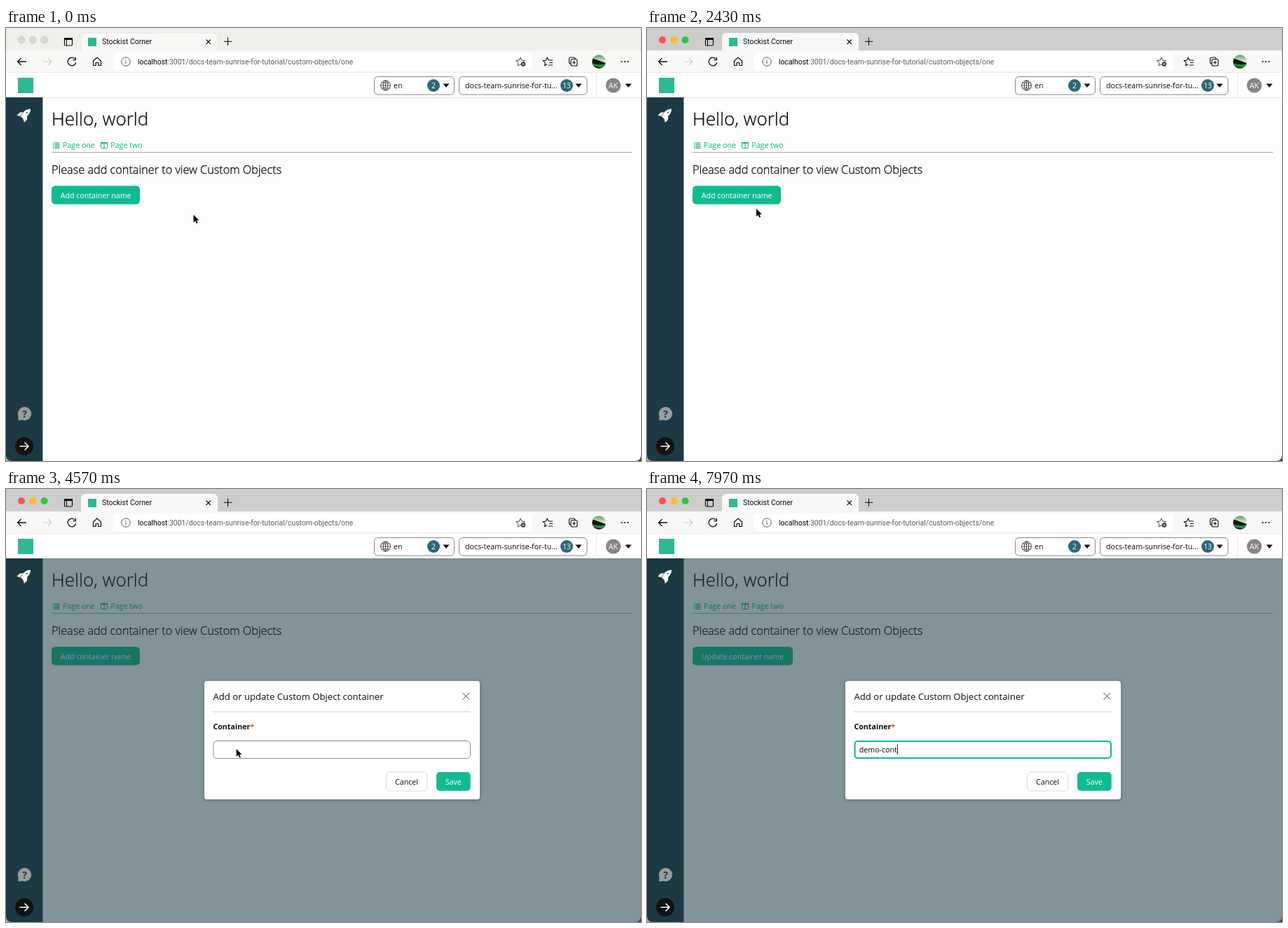
An HTML page with a canvas that plays this animation: 906 by 618 pixels, repeating every 8 s.

```html
<!DOCTYPE html>
<html lang="en">
<head>
<meta charset="utf-8">
<title>Custom objects</title>
<style>
html, body { margin: 0; width: 100%; height: 100%; overflow: hidden; background: #fdfdfd; }
canvas { display: block; width: 906px; height: 618px; }
</style>
</head>
<body>
<canvas id="stage"></canvas>
<script>
const W = 906, H = 618, LOOP = 8000, SIDE = 52.4;
const canvas = document.getElementById('stage');
const ratio = window.devicePixelRatio || 1;
canvas.width = W * ratio;
canvas.height = H * ratio;
const c = canvas.getContext('2d');

const UI = '"Open Sans", sans-serif', CHROME = 'Roboto, sans-serif';
const GREEN = '#11bb91', NAVY = '#1d3943', TEAL = '#2f6875', INK = '#0c0c0c';

const TIMES = { activate: 1900, click: 3400, focus: 4720, type: 6750 };
const TYPED = 'demo-cont', KEY_GAP = 140;

// Pointer stops: time, x, y
const PATH = [
  [0, 267.5, 266.5], [870, 267.5, 266.5], [1220, 164, 243], [1700, 164, 243],
  [2050, 156, 258], [2600, 156, 258], [2950, 155, 241], [4200, 155, 241], [4620, 335.5, 376]
];

const clamp = v => Math.max(0, Math.min(1, v));
const ease = v => v * v * (3 - 2 * v);
const ramp = (t, from, span) => ease(clamp((t - from) / span));

function pointerAt(t) {
  let i = PATH.length - 1;
  while (PATH[i][0] > t) i--;
  const a = PATH[i], b = PATH[i + 1] || a;
  const k = ramp(t, a[0], b[0] - a[0] || 1);
  return { x: a[1] + (b[1] - a[1]) * k, y: a[2] + (b[2] - a[2]) * k };
}

function rect(x, y, w, h, fill) {
  c.fillStyle = fill;
  c.fillRect(x, y, w, h);
}

function box(x, y, w, h, r, fill, stroke, lw = 1) {
  c.beginPath();
  c.roundRect(x, y, w, h, r);
  if (fill) { c.fillStyle = fill; c.fill(); }
  if (stroke) { c.strokeStyle = stroke; c.lineWidth = lw; c.stroke(); }
}

function disc(x, y, r, fill, stroke, lw = 1) {
  c.beginPath();
  c.arc(x, y, r, 0, 7);
  if (fill) { c.fillStyle = fill; c.fill(); }
  if (stroke) { c.strokeStyle = stroke; c.lineWidth = lw; c.stroke(); }
}

function lines(d, color, lw = 1.2) {
  c.strokeStyle = color;
  c.lineWidth = lw;
  c.stroke(new Path2D(d));
}

function shape(d, color) {
  c.fillStyle = color;
  c.fill(new Path2D(d));
}

function text(s, x, y, size, color, weight = 400, family = UI, align = 'left') {
  c.font = `${weight} ${size}px ${family}`;
  c.textAlign = align;
  c.fillStyle = color;
  c.fillText(s, x, y);
}

// Light type with a hairline outline, so it renders a little darker
function heading(s, x, y, size) {
  text(s, x, y, size, INK, 300);
  c.strokeStyle = INK;
  c.lineWidth = .3;
  c.strokeText(s, x, y);
}

function shadow(color, blur, dy) {
  c.shadowColor = color;
  c.shadowBlur = blur * ratio;
  c.shadowOffsetY = dy * ratio;
}

function caretDown(x) {
  shape(`M${x - 4.5} 79.5h9l-4.5 5.5z`, INK);
}

function tabStrip(active) {
  rect(0, 0, W, 33, active ? '#cfcdcb' : '#f0efec');
  ['#f94f57', '#fdbb2e', '#2ac840'].forEach((color, i) =>
    disc(22 + i * 16.3, 17, 5, active ? color : '#d9d7d4', active ? null : '#cbc9c6', .7));
  box(83.5, 14.5, 11, 10.5, 1.5, null, INK, 1.2);
  rect(83, 14, 12, 3, INK);
  rect(86, 17, 1, 8, INK);
  box(107, 7, 195, 30, 6, '#f8f8f7', active ? null : '#dedddb', .6);
  rect(117, 14, 12, 12, '#2fb796');
  text('Stockist Corner', 137, 23.3, 10.4, INK, 400, CHROME);
  lines('M285.5 16.5l6.5 6.5m0-6.5l-6.5 6.5M316.5 13.5v11.5m-5.7-5.7h11.5', INK, 1.1);
}

function avatar() {
  c.save();
  c.beginPath();
  c.arc(846, 48, 9.8, 0, 7);
  c.clip();
  const sky = c.createLinearGradient(0, 38, 0, 48);
  sky.addColorStop(0, '#5c9a60');
  sky.addColorStop(1, '#dfeadf');
  rect(836, 38, 20, 20, sky);
  shape('M836 43l20 7v8h-20z', '#0d1a0e');
  shape('M836 50q10 4 20 1v4q-10 3-20-2z', '#2f8a3a');
  c.restore();
}

function toolbar() {
  rect(0, 32, W, 32, '#f8f8f7');
  rect(0, 63.4, W, .6, '#e2e1e0');
  lines('M29 48H16.5m5-5l-5 5 5 5', INK, 1.3);
  lines('M52 48h13m-5-5l5 5-5 5', '#cfcfcd', 1.2);
  c.beginPath();
  c.arc(94, 48, 5.8, .2, 5.5);
  c.strokeStyle = INK;
  c.lineWidth = 1.3;
  c.stroke();
  lines('M99.3 41.8v3.8h-3.8', INK, 1.3);
  lines('M124.5 47l5.5-5 5.5 5v6.5h-3.7v-4h-3.6v4h-3.7z', INK, 1.2);

  box(153, 35, 598, 26, 5, '#fff');
  disc(171, 48, 6.2, null, '#555', 1);
  rect(170.5, 47, 1, 4, '#555');
  rect(170.4, 44.7, 1.2, 1.2, '#555');
  const host = 'localhost';
  text(host, 188, 51.5, 10.4, '#000', 400, CHROME);
  const hostWidth = c.measureText(host).width;
  text(':3001/docs-team-sunrise-for-tutorial/custom-objects/one',
    188 + hostWidth, 51.5, 10.4, '#5c5c5c', 400, CHROME);

  const star = 'l1.9 4 4.4.6-3.2 3 .8 4.3-3.9-2-3.9 2 .8-4.3-3.2-3 4.4-.6z';
  lines('M734 42' + star, '#444', 1);
  disc(738, 51.5, 3.2, '#333');
  lines('M738 49.8v3.4m-1.7-1.7h3.4', '#fff', .8);
  lines('M777 46h-3l-1.8-3.7-1.9 3.7-4 .6 3 2.8-.7 4.2 3.6-1.9M775 49.5h5M774 53h6M777 46h3', INK, 1.1);
  box(803.5, 42, 8.5, 9, 2, null, INK, 1.1);
  box(806, 44.5, 9, 9.5, 2, '#f8f8f7', INK, 1.1);
  lines('M810.5 46.7v5m-2.5-2.5h5', INK, 1);
  avatar();
  [878.5, 883, 887.5].forEach(x => disc(x, 48, 1.1, INK));
}

function header() {
  rect(0, 64, W, 35, '#fff');
  rect(842, 64, 1, 35, '#e9e9e9');
  rect(17, 71, 22, 22, '#2fb796');

  box(525.5, 69.5, 114, 25.5, 5, '#fff', '#868686');
  disc(541.5, 82, 7, null, '#333', .9);
  c.beginPath();
  c.ellipse(541.5, 82, 3.2, 7, 0, 0, 7);
  c.stroke();
  lines('M534.5 82h14M541.5 75v14M535.8 78.3h11.4M535.8 85.7h11.4', '#333', .8);
  text('en', 553, 86, 10.65, INK);
  disc(610, 82, 9, TEAL);
  text('2', 610, 85.8, 10.2, '#fff', 400, UI, 'center');
  caretDown(628);

  box(646.5, 69.5, 182.5, 25.5, 5, '#fff', '#868686');
  text('docs-team-sunrise-for-tu...', 655, 86, 10.65, INK);
  disc(800, 82, 9, TEAL);
  text('13', 800, 85.8, 10.2, '#fff', 400, UI, 'center');
  caretDown(817);

  disc(866.5, 82, 10.6, '#858585');
  text('AK', 866.5, 86, 10.65, '#fff', 400, UI, 'center');
  caretDown(888);
}

function sidebar() {
  rect(0, 99, SIDE, H - 99, NAVY);

  c.save();
  c.translate(26.5, 124);
  c.rotate(Math.PI / 4);
  c.scale(.92, .92);
  shape('M0-13C4.5-9 5-3 3.6 6h-7.2C-5-3-4.5-9 0-13zM-4-2l-4 5v6l5-3zM4-2l4 5v6l-5-3z', '#fff');
  disc(0, -5, 1.1, NAVY);
  c.restore();

  disc(26.5, 550.5, 9.7, '#9b9b9b');
  shape('M17.5 553v7.2l6-.8z', '#9b9b9b');
  text('?', 26.5, 555.7, 14, NAVY, 700, UI, 'center');

  disc(26, 597, 13, '#12130f');
  lines('M19.5 597h12.5m-5.5-5.5l5.5 5.5-5.5 5.5', '#fff', 1.5);
}

function page(hover, updated) {
  rect(52, 99, W - 52, H - 99, '#fdfdfd');
  rect(52, 99, W - 52, 1, '#e0dfe6');
  heading('Hello, world', 65, 139, 26.1);

  const link = '#10b088';
  for (let y = 163.5; y < 172; y += 2.4) {
    rect(67, y, 1.5, 1.3, link);
    rect(69.5, y, 7, 1.3, link);
  }
  text('Page one', 81, 171, 10.65, link);
  box(135.5, 163.5, 9, 8, 1, null, link);
  rect(135, 163, 10, 1.8, link);
  rect(139.5, 164, 1, 8, link);
  text('Page two', 149.3, 171, 10.65, link);
  rect(65, 177, 828, 1, '#a9a9a9');

  heading('Please add container to view Custom Objects', 65, 207.5, 16.25);

  c.save();
  if (hover) shadow('rgba(0,0,0,.4)', 5, 2);
  box(65, 225.2, updated ? 143 : 126, 26.2, 5, hover ? '#078365' : GREEN);
  c.restore();
  text(updated ? 'Update container name' : 'Add container name', 77.7, 242.5, 10.65, '#fff');
}

function modal(t, alpha) {
  c.save();
  c.globalAlpha = alpha;
  rect(52, 99, W - 52, H - 99, 'rgba(30,60,72,.55)');

  c.save();
  shadow('rgba(0,0,0,.3)', 5, 1);
  box(283, 274, 393, 169, 4, '#fff');
  c.restore();
  text('Add or update Custom Object container', 295.5, 300.6, 13.1, INK);
  lines('M651.5 291l9.5 9.5m0-9.5l-9.5 9.5', '#444', 1);
  rect(295.5, 317.5, 367.5, 1, '#c9c5e6');
  text('Container', 295.5, 342.7, 10.65, INK, 700);
  text('*', 295.5 + c.measureText('Container').width, 342.7, 10.65, '#e8581c', 700);

  const focused = t >= TIMES.focus;
  if (focused) box(296.5, 360, 365.5, 24, 4, '#fff', GREEN, 2.2);
  else box(296, 359.5, 366.5, 25, 5, '#fff', '#8b8b93');

  const count = t < TIMES.type ? 0
    : Math.min(TYPED.length, 1 + Math.floor((t - TIMES.type) / KEY_GAP));
  const value = TYPED.slice(0, count);
  text(value, 302.8, 376, 10.65, INK);
  const caretOn = count > 0 || (t - TIMES.focus) % 1000 < 500;
  if (focused && caretOn) rect(303 + c.measureText(value).width, 365, 1, 14, '#222');

  box(542.5, 404, 58.5, 27, 5, '#fff', '#dadada');
  text('Cancel', 571.5, 421.7, 10.65, INK, 400, UI, 'center');
  box(614, 404, 48.7, 26.7, 5, GREEN);
  text('Save', 638.3, 421.7, 10.65, '#fff', 400, UI, 'center');
  c.restore();
}

function clickRing(t, start, x, y) {
  const age = t - start;
  if (age < 0 || age > 500) return;
  c.save();
  c.globalAlpha = .5 * (1 - ramp(age, 300, 200));
  disc(x, y, 13, '#c9cf4c');
  c.restore();
}

function pointer(p, hand) {
  c.save();
  c.translate(p.x, p.y);
  c.scale(.92, .92);
  c.lineJoin = 'round';
  if (hand) {
    const d = 'M0 2.2c0-1.6 2.2-1.6 2.2 0v4c.3-1 2-.9 2.2.2.5-.8 1.9-.6 2.1.4.6-.6 1.7-.2 1.7.8v3c0 2-1.2 2.5-1.2 4.4H1C.6 13-.7 11.8-2.3 9.3c-1-1.6.6-2.2 1.4-1.2L0 9z';
    shape(d, '#fff');
    lines(d, '#111', .9);
    lines('M2.5 10v3M4.3 10v3M6 10v3', '#111', .5);
  } else {
    const d = 'M0 0v12l2.8-2.6 1.9 4.3 2-.9-1.9-4.1h3.8z';
    lines(d, '#fff', 1.8);
    shape(d, '#000');
  }
  c.restore();
}

function corners() {
  shape(`M0 ${H}v-9q0 9 9 9z`, '#a9adb0');
  shape(`M${W} ${H}v-9q0 9-9 9z`, '#3c4348');
}

function draw(t) {
  c.setTransform(ratio, 0, 0, ratio, 0, 0);
  const active = t >= TIMES.activate;
  const open = ramp(t, TIMES.click + 20, 150);
  const p = pointerAt(t);
  const typing = t >= TIMES.type;
  const hover = t > 2600 && t < TIMES.click + 60 && p.y < 251;

  tabStrip(active);
  toolbar();
  header();
  page(hover, typing);
  if (open > 0) modal(t, open);
  sidebar();
  clickRing(t, TIMES.click, 155, 241);
  clickRing(t, TIMES.focus, 335.5, 376);
  if (!typing) pointer(p, hover);
  corners();
}

function tick() {
  draw(performance.now() % LOOP);
  requestAnimationFrame(tick);
}
tick();
</script>
</body>
</html>
```
